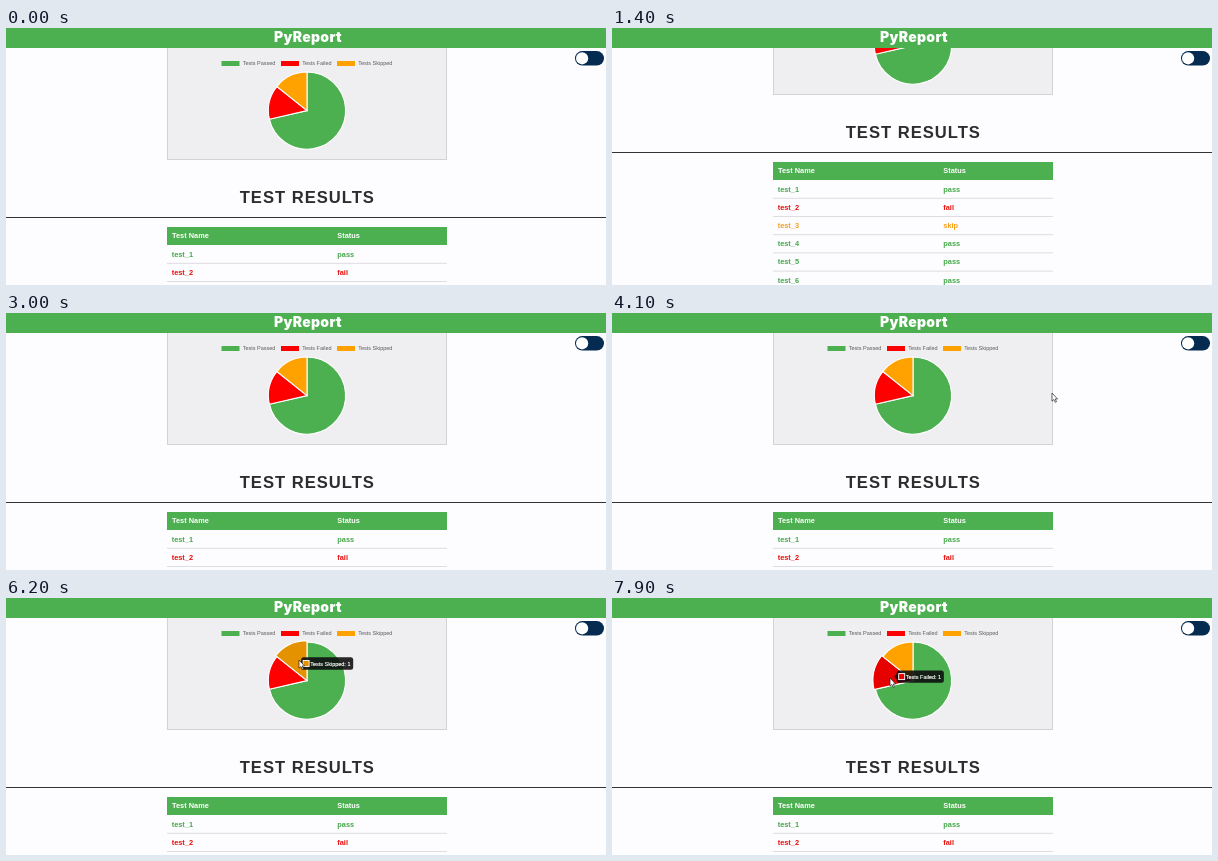
Recreate the animation shown at these times as an HTML page. Size 600 by 257 pixels, loop 8000 ms.

```html
<!DOCTYPE html>
<html lang="en">
<head>
<meta charset="utf-8">
<title>PyReport</title>
<style>
  html, body { margin: 0; width: 100%; height: 100%; overflow: hidden; background: #fdfcfe; }
  svg { display: block; width: 100%; height: 100%; font-family: "Liberation Sans", Arial, sans-serif; }
  .cell { font-size: 7.4px; font-weight: 700; }
  .small { font-size: 5.5px; }
  .heading { font-size: 16.6px; font-weight: 700; letter-spacing: 1px; fill: #2d2d2d; }
  .brand { font: 900 14px Inter, "Liberation Sans", sans-serif; letter-spacing: .3px; fill: #fff; text-anchor: middle; }
</style>
</head>
<body>
<svg viewBox="0 0 600 257">
  <g id="page"></g>
  <g id="tip"></g>
  <path id="cursor" d="M0 0V8.2L1.9 6.5L3.2 9.3L4.5 8.7L3.2 6H5.6Z" fill="#fff" stroke="#222" stroke-width=".7"/>
  <rect width="600" height="20" fill="#4caf50"/>
  <text class="brand" x="302" y="13.8">PyReport</text>
  <rect x="569" y="23" width="29" height="14.6" rx="7.3" fill="#062b50"/>
  <circle cx="576.1" cy="30.3" r="6.1" fill="#fff"/>
</svg>
<script>
const LOOP = 8000, STEP = 100, GREEN = '#4caf50';
const CENTER = { x: 301, y: 82.6 }, RADIUS = 38.6, HOVER_RADIUS = 40;
const slices = [
  { name: 'Passed', count: 5, color: GREEN, hover: '#2fb234', legendX: 215.5 },
  { name: 'Failed', count: 1, color: '#ff0000', hover: '#e60000', legendX: 275 },
  { name: 'Skipped', count: 1, color: '#ffa200', hover: '#e59200', legendX: 331 },
];
const statusColor = { pass: '#45a849', fail: '#e8100c', skip: '#f5a01d' };

const byId = id => document.getElementById(id);
const page = byId('page'), tip = byId('tip'), cursor = byId('cursor');

function add(parent, tag, attrs, text) {
  const node = document.createElementNS('http://www.w3.org/2000/svg', tag);
  for (const key in attrs) node.setAttribute(key, attrs[key]);
  if (text) node.textContent = text;
  parent.append(node);
  return node;
}
const rect = (x, y, width, height, fill, more) =>
  add(page, 'rect', { x, y, width, height, fill, ...more });
const label = (x, y, text, fill, cls = 'cell') =>
  add(page, 'text', { x, y, fill, class: cls }, text);

// Chart panel
rect(161.5, -60, 279, 191.5, '#efeef0', { stroke: '#d3d2d5', 'stroke-width': 1 });
let angle = -Math.PI / 2;
for (const s of slices) {
  const sweep = s.count / 7 * 2 * Math.PI;
  s.start = angle;
  s.end = angle += sweep;
  s.mid = s.end - sweep / 2;
  s.x = CENTER.x + RADIUS / 2 * Math.cos(s.mid);
  s.y = CENTER.y + RADIUS / 2 * Math.sin(s.mid) + .3;
  s.path = add(page, 'path', { stroke: '#fff', 'stroke-width': 1.1 });
  rect(s.legendX, 33, 18, 5, s.color);
  label(s.legendX + 21.2, 37.4, 'Tests ' + s.name, '#5c5c5c', 'small');
}

// Results and totals
label(233.7, 175.3, 'TEST RESULTS', '', 'heading');
rect(0, 189, 600, 1, '#333');

function tableHead(y, cells) {
  rect(161, y, 280, 18, GREEN);
  for (const [x, text] of cells) label(x, y + 11.4, text, '#fff');
}
tableHead(199, [[166, 'Test Name'], [331.3, 'Status']]);
['pass', 'fail', 'skip', 'pass', 'pass', 'pass', 'pass'].forEach((status, i) => {
  const y = 228.5 + i * 18.2;
  label(165.7, y, 'test_' + (i + 1), statusColor[status]);
  label(331.3, y, status, statusColor[status]);
  rect(161, y + 6.3, 280, 1, '#dedde0');
});
tableHead(354, [[166, 'Total Tests'], [228, 'Tests Passed'], [301.3, 'Tests Failed'], [368.7, 'Tests Skipped']]);
[[165.7, 7], [227.7, 5], [301.3, 1], [368.7, 1]].forEach(([x, n]) =>
  label(x, 383.4, String(n), '#222').setAttribute('style', 'font-weight:400'));
rect(161, 389.5, 280, 1, '#dedde0');

// Tooltip
const bubble = add(tip, 'path', { fill: '#0c0c0c', 'fill-opacity': .88 });
const swatch = add(tip, 'rect', { x: 2, y: -3, width: 6, height: 6, stroke: '#fff', 'stroke-width': .9 });
const tipText = add(tip, 'text', { x: 9, y: 2, fill: '#fff', stroke: '#fff', 'stroke-width': .15, class: 'small' });
const tipLabel = s => `Tests ${s.name}: ${s.count}`;
const boxes = slices.map((s, i) => {
  tipText.textContent = tipLabel(s);
  const w = tipText.getComputedTextLength() + 11.7;
  return { x: i ? s.x + 2.5 : s.x - 2.5 - w, y: s.y, w };
});

// [time, value...], linear between entries
const scrollKeys = [[1000, 0], [1100, 6], [1200, 22], [1300, 43], [1400, 65], [1600, 107],
  [1800, 135], [1900, 141], [2800, 141], [2900, 60], [3000, 0]];
const cursorKeys = [[3700, 604, 78], [3900, 540, 77], [4100, 440, 80], [4300, 341, 84], [4600, 320.6, 86],
  [5300, 320.6, 86], [5500, 316, 81], [5800, 300, 67], [6100, 293, 62],
  [6800, 293, 62], [7000, 291, 65], [7300, 285, 72], [7700, 278, 80]];
const hoverKeys = [[4300, 0], [5800, 2], [7300, 1]];

const mix = (a, b, k) => a + (b - a) * k;
const easeOut = k => 1 - (1 - Math.min(1, k)) ** 4;

function sample(keys, t) {
  const i = keys.findIndex(key => key[0] > t);
  if (i < 0) return keys[keys.length - 1].slice(1);
  if (i === 0) return keys[0].slice(1);
  const [a, b] = [keys[i - 1], keys[i]];
  const k = (t - a[0]) / (b[0] - a[0]);
  return a.slice(1).map((v, n) => mix(v, b[n + 1], k));
}

function wedge(s, r) {
  const at = a => `${CENTER.x + r * Math.cos(a)} ${CENTER.y + r * Math.sin(a)}`;
  const large = s.end - s.start > Math.PI ? 1 : 0;
  return `M${CENTER.x} ${CENTER.y}L${at(s.start)}A${r} ${r} 0 ${large} 1 ${at(s.end)}Z`;
}

// Rounded box centred on y = 0, with a caret on one side
function bubblePath(w, caretLeft) {
  const right = caretLeft ? 'v7.4' : 'v1.2l2.5 2.5l-2.5 2.5v1.2';
  const left = caretLeft ? 'v-1.2l-2.5 -2.5l2.5 -2.5v-1.2' : 'v-7.4';
  return `M2.5 -6.2h${w - 5}q2.5 0 2.5 2.5${right}q0 2.5 -2.5 2.5` +
    `h${5 - w}q-2.5 0 -2.5 -2.5${left}q0 -2.5 2.5 -2.5Z`;
}

function drawTip(step, t) {
  tip.style.display = step < 0 ? 'none' : '';
  if (step < 0) return;
  const [since, index] = hoverKeys[step];
  const to = boxes[index], from = step ? boxes[hoverKeys[step - 1][1]] : to;
  const age = t - since + STEP, k = easeOut(age / 400);
  const x = mix(from.x, to.x, k), y = mix(from.y, to.y, k), w = mix(from.w, to.w, k);
  bubble.setAttribute('d', bubblePath(w, index > 0));
  swatch.setAttribute('fill', slices[index].hover);
  tipText.textContent = tipLabel(slices[index]);
  tip.setAttribute('transform', `translate(${x} ${y})`);
  tip.setAttribute('opacity', step ? 1 : Math.min(1, age / 300));
}

function draw(t) {
  page.setAttribute('transform', `translate(0 ${-sample(scrollKeys, t)[0]})`);
  const step = hoverKeys.filter(key => key[0] <= t).length - 1;
  const active = step < 0 ? -1 : hoverKeys[step][1];
  slices.forEach((s, i) => {
    s.path.setAttribute('d', wedge(s, i === active ? HOVER_RADIUS : RADIUS));
    s.path.setAttribute('fill', i === active ? s.hover : s.color);
  });
  drawTip(step, t);
  const [x, y] = sample(cursorKeys, t);
  cursor.setAttribute('transform', `translate(${x} ${y})`);
  cursor.style.display = t < 3800 ? 'none' : '';
}

const begin = performance.now();
function tick() {
  const t = (performance.now() - begin) % LOOP;
  draw(Math.floor(t / STEP) * STEP);
  requestAnimationFrame(tick);
}
tick();
</script>
</body>
</html>
```
